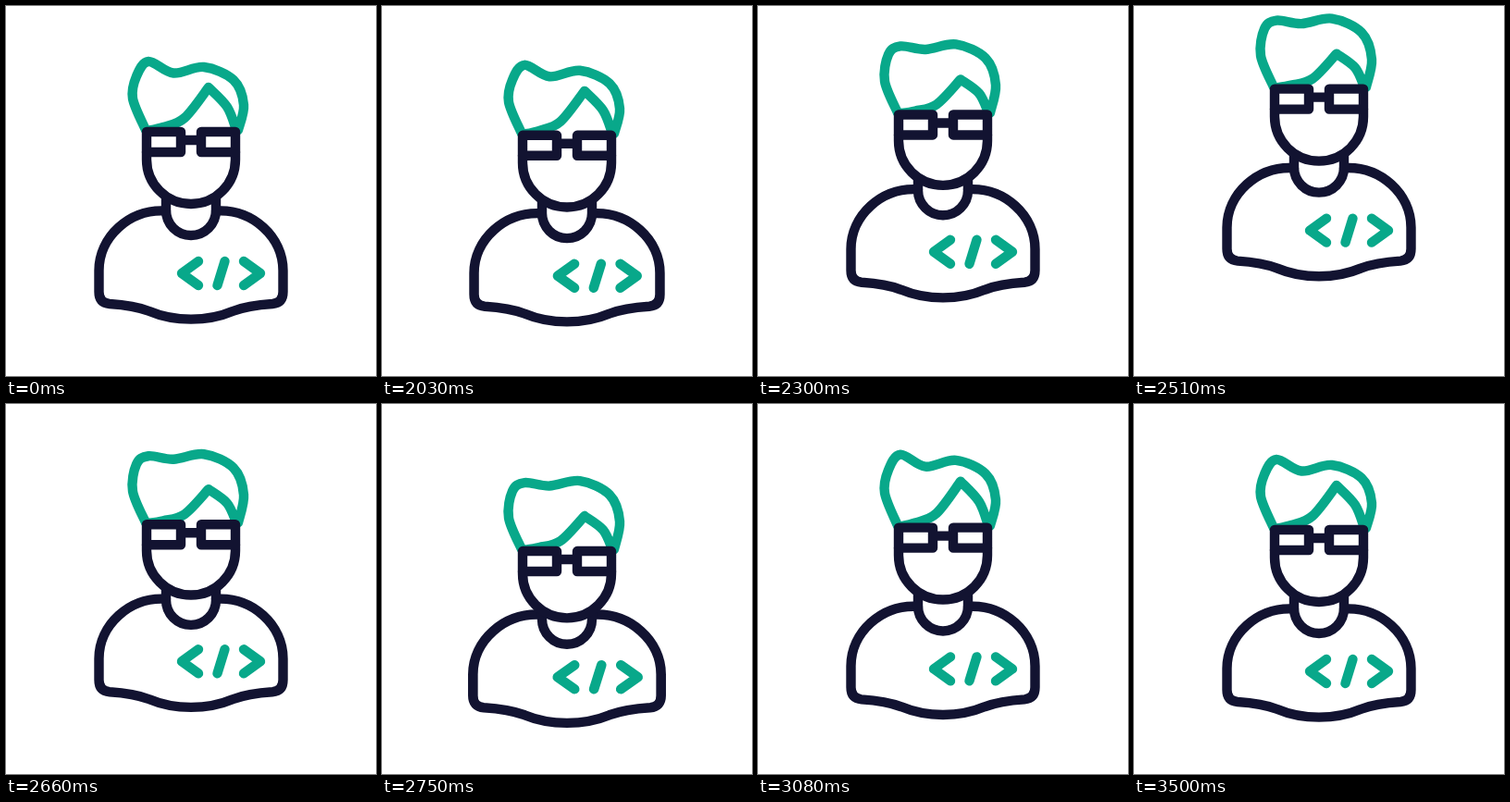
An HTML page that plays this animation: 400 px wide and 400 px high, repeating every 3.56 s.

```html
<!DOCTYPE html>
<html lang="en">
<head>
<meta charset="utf-8">
<title>Jumping developer</title>
<style>
  html, body { margin: 0; height: 100%; overflow: hidden; background: #fff; }
  svg { display: block; width: 100%; height: 100%; }
  path { fill: none; stroke: #121331; stroke-width: 10.4; stroke-linecap: round; stroke-linejoin: round; }
  .green { stroke: #08a88a; }
</style>
</head>
<body>
<svg viewBox="0 0 400 400">
  <path id="hair" class="green"/>
  <g id="body">
    <path d="M173 221.500C133 219 100.500 250 100.500 286V309Q100.500 321 112 322C128 323 142 325 155 330C182 341.500 218 341.500 245 330C258 325 272 323 288 322Q299.500 321 299.500 309V286C299.500 250 267 219 227 221.500"/>
    <path class="green" d="M208 276L190 289L208 302M236.500 276L228.500 302M257 276L275 289L257 302"/>
  </g>
  <path id="neck"/>
  <path id="face"/>
  <path id="glasses" d="M152 136H189V158H152ZM211 136H248V158H211ZM189 145H211"/>
</svg>
<script>
const LOOP = 3560, START = 2030, END = 3500, STEP = 30;
const LANDING = 2790, REBOUND = 270;

// Hair key points above the glasses: x, y, and the shift of y when flattened
const outline = [[151, -2, 0], [137, -36, 0], [141, -60, -5], [154, -76, 2], [181, -63.5, -7],
  [214, -70, -6], [246, -56, -5], [257, -29, -3], [251, -2, 0]];
const parting = [[152, -1, 0], [170, -5, 1], [193, -15, 4], [219, -48, 10]];
const fringe = [[219, -48, 10], [239, -27, 4], [249, -2, 0]];

const el = id => document.getElementById(id);
const ease = (t, from, to) =>
  (1 - Math.cos(Math.PI * Math.min(1, Math.max(0, (t - from) / (to - from))))) / 2;
const bump = (t, middle, reach) => 1 - ease(Math.abs(t - middle), 0, reach);

// Crouch, jump, then a damped rebound after landing
function bodyOffset(t) {
  const phase = Math.max(0, (t - LANDING) / REBOUND);
  const crouch = 8 * ease(t, 1970, 2120) * Math.cos(Math.PI * phase) * Math.exp(-phase);
  return crouch - 58 * bump(t, 2457, 330);
}

// Smooth curve through all points
function spline(points) {
  const at = i => points[Math.min(points.length - 1, Math.max(0, i))];
  const handle = (i, side) => at(i).map((v, k) => v + side * (at(i + 1)[k] - at(i - 1)[k]) / 6);
  return "M" + points[0] + points.slice(1).map((p, i) =>
    `C${handle(i, 1)} ${handle(i + 1, -1)} ${p}`).join("");
}

function draw(t) {
  const body = bodyOffset(t);
  const squash = 11 * bump(t, 2190, 200) + 23 * bump(t, 2840, 260);
  const head = body + squash;
  const chin = body + 0.66 * squash;
  const collar = body + 0.33 * squash;
  const widen = 1 + 0.0035 * Math.max(body, 0);
  const flatness = ease(t, 2020, 2220) - ease(t, 2890, 3065);
  const stretch = 1 + 0.04 * bump(t, 3080, 200);

  el("body").setAttribute("transform", `translate(200 ${body}) scale(${widen} 1) translate(-200 0)`);
  el("glasses").setAttribute("transform", `translate(0 ${head})`);
  el("face").setAttribute("d",
    `M152 ${158 + head}V${166 + chin}A48 48 0 0 0 248 ${166 + chin}V${158 + head}`);
  el("neck").setAttribute("d",
    `M173 ${207 + chin}V${221 + collar}A27 27 0 0 0 227 ${221 + collar}V${207 + chin}`);
  el("hair").setAttribute("d", [outline, parting, fringe].map(line => spline(
    line.map(([x, y, shift]) => [x, 136 + head + (y + shift * flatness) * stretch]))).join(""));
}

function tick() {
  const t = performance.now() % LOOP;
  const step = START + Math.floor((t - START) / STEP) * STEP;
  draw(t < START || step >= END ? 0 : step);
  requestAnimationFrame(tick);
}
tick();
</script>
</body>
</html>
```
